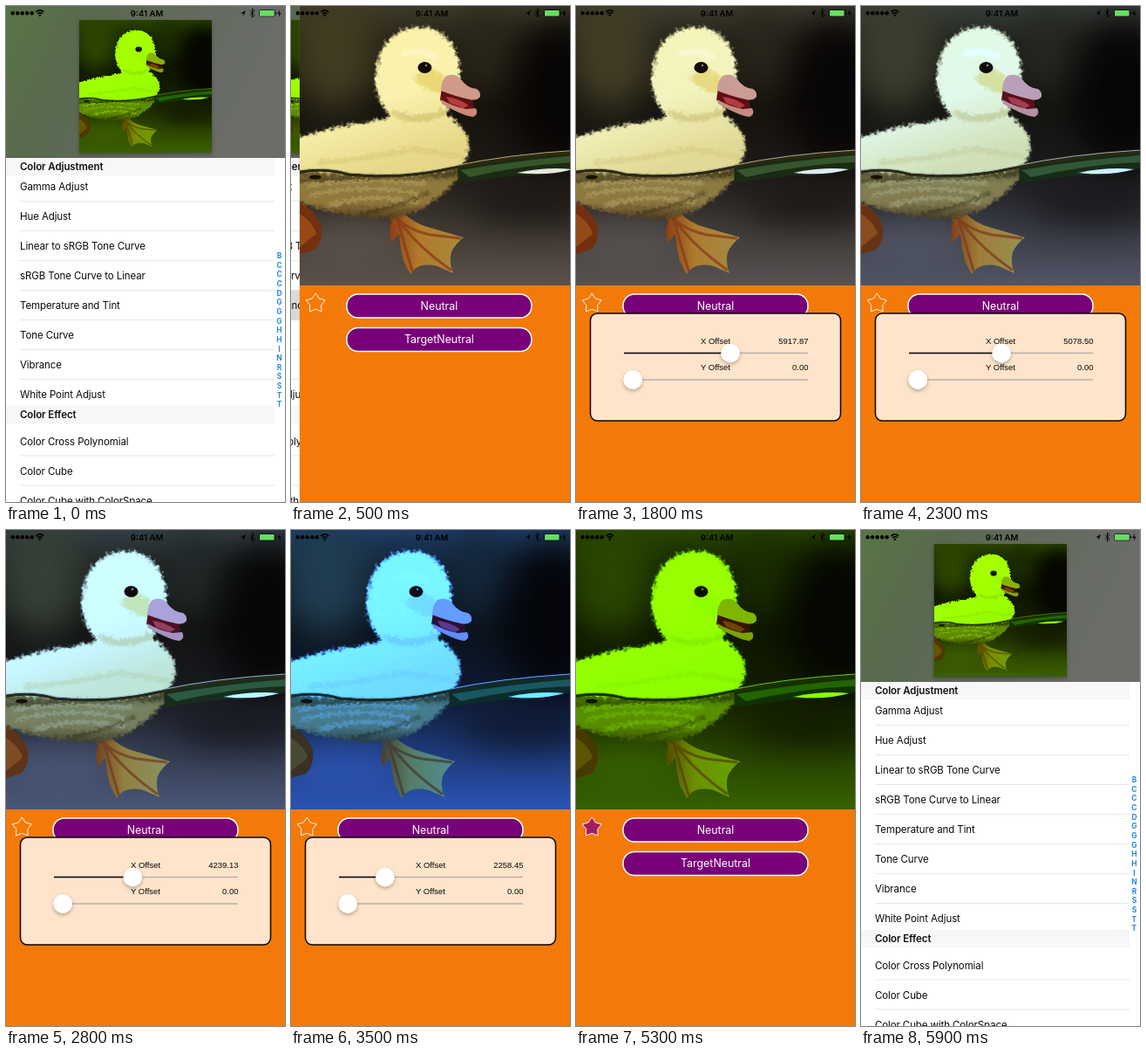
Animation, 320 px wide and 568 px high, one loop 6 s. Source, as an HTML page:

```html
<!DOCTYPE html>
<html lang="en">
<head>
<meta charset="utf-8">
<title>Colour filter browser</title>
<style>
html, body { margin: 0; width: 100%; height: 100%; overflow: hidden; background: #fff; }
svg { display: block; width: 320px; height: 568px; }
text { font-family: Inter, "Open Sans", sans-serif; }
.row { font-size: 11.5px; letter-spacing: -.1px; fill: #0a0a0a; }
.head { font-size: 11.5px; font-weight: 600; letter-spacing: -.1px; fill: #111; }
.index { font-size: 8.4px; font-weight: 700; fill: #2588e6; text-anchor: middle; }
.btn { font-size: 12.4px; fill: #fff; text-anchor: middle; }
.label { font: 9.5px "Liberation Sans", Arial, sans-serif; fill: #080808; }
.end { text-anchor: end; }
</style>
</head>
<body>
<svg viewBox="0 0 320 568">
  <defs>
    <filter id="tint" filterUnits="userSpaceOnUse" x="0" y="0" width="320" height="320" color-interpolation-filters="sRGB">
      <feColorMatrix id="gain" values="1 0 0 0 0 0 1 0 0 0 0 0 1 0 0 0 0 0 1 0"/>
    </filter>
    <filter id="green" filterUnits="userSpaceOnUse" x="0" y="0" width="320" height="320" color-interpolation-filters="sRGB">
      <feColorMatrix values=".66 0 0 0 0 0 1.16 0 0 0 0 0 0 0 0 0 0 0 1 0"/>
    </filter>
    <filter id="fur" filterUnits="userSpaceOnUse" x="-20" y="0" width="360" height="320" color-interpolation-filters="sRGB">
      <feTurbulence type="fractalNoise" baseFrequency=".22" numOctaves="2" seed="4" result="noise"/>
      <feGaussianBlur in="SourceGraphic" stdDeviation="1.4" result="soft"/>
      <feDisplacementMap in="soft" in2="noise" scale="9" xChannelSelector="R" yChannelSelector="G"/>
    </filter>
    <filter id="haze" filterUnits="userSpaceOnUse" x="-80" y="-80" width="480" height="480" color-interpolation-filters="sRGB">
      <feGaussianBlur stdDeviation="20"/>
    </filter>
    <filter id="drop" x="-60%" y="-60%" width="220%" height="220%">
      <feDropShadow dx="0" dy="2" stdDeviation="2" flood-opacity=".3"/>
    </filter>
    <linearGradient id="back" x2="0" y2="1">
      <stop offset="0" stop-color="#3f3b2b"/><stop offset=".14" stop-color="#221f14"/>
      <stop offset=".35" stop-color="#16130c"/><stop offset=".6" stop-color="#1f1a16"/>
      <stop offset=".78" stop-color="#3d3731"/><stop offset="1" stop-color="#5a524b"/>
    </linearGradient>
    <linearGradient id="down" x2=".4" y2="1">
      <stop offset="0" stop-color="#fbf2a6"/><stop offset=".6" stop-color="#f9f1ad"/><stop offset="1" stop-color="#e6d888"/>
    </linearGradient>
    <linearGradient id="belly" x2="0" y2="1">
      <stop offset="0" stop-color="#3a3014"/><stop offset=".3" stop-color="#8f7a3c"/>
      <stop offset=".7" stop-color="#90763a"/><stop offset="1" stop-color="#4d3a1c"/>
    </linearGradient>
    <linearGradient id="web">
      <stop offset="0" stop-color="#8a3a12"/><stop offset=".4" stop-color="#b07a2a"/><stop offset="1" stop-color="#a88a3e"/>
    </linearGradient>
    <linearGradient id="blurred" y2=".25">
      <stop offset="0" stop-color="#587545"/><stop offset=".3" stop-color="#59694f"/>
      <stop offset=".75" stop-color="#666b62"/><stop offset="1" stop-color="#6b6d69"/>
    </linearGradient>
    <clipPath id="square"><path d="M0 0h320v320H0z"/></clipPath>

    <g id="duck" clip-path="url(#square)">
      <path d="M0 0h320v320H0z" fill="url(#back)"/>
      <g filter="url(#haze)">
        <ellipse cx="40" cy="50" rx="48" ry="70" fill="#423c22"/>
        <ellipse cx="215" cy="45" rx="30" ry="50" fill="#2a271a"/>
        <ellipse cx="300" cy="100" rx="60" ry="85" fill="#080605"/>
        <ellipse cx="270" cy="225" rx="80" ry="22" fill="#1b1613"/>
        <ellipse cx="60" cy="275" rx="70" ry="25" fill="#5a524a"/>
      </g>
      <path d="M0 224Q18 234 25 252Q27 270 17 279L0 284Z" fill="#74300f"/>
      <path d="M0 238Q16 248 19 261L0 276Z" fill="#984916"/>
      <path d="M101 239L117 235Q132 250 150 254L188 265Q178 273 174 282Q171 294 176 306L158 298Q142 294 132 301L127 307L119 292Q115 277 114 261L105 271Q101 254 106 248Z" fill="url(#web)"/>
      <path d="M109 241Q125 257 150 262L184 266M112 243Q133 274 173 302M112 244Q120 272 129 303" fill="none" stroke="#8a3a16" stroke-width="3" stroke-linecap="round" opacity=".75"/>
      <g filter="url(#fur)">
        <path d="M-10 190L190 184Q181 203 158 220Q130 242 98 243Q46 244 -10 221Z" fill="url(#belly)"/>
        <path d="M8 206Q70 196 145 204M12 217Q80 201 142 217M32 229Q85 212 138 226" fill="none" stroke="#d6c683" stroke-width="2.500" opacity=".55"/>
        <path d="M-10 201Q60 196 180 193M70 238Q112 231 148 213" fill="none" stroke="#2c230d" stroke-width="3" opacity=".6"/>
      </g>
      <g filter="url(#fur)">
        <path d="M-12 154Q30 140 62 135Q86 132 104 127C92 113 84 94 88 74C91 44 109 24 138 24C162 24 180 43 183 66C185 86 181 106 170 118Q168 124 176 130Q193 142 194 158Q195 175 184 185Q130 199 60 193L-12 188Z" fill="url(#down)"/>
        <path d="M108 122Q134 137 168 120" fill="none" stroke="#bfab52" stroke-width="8" opacity=".45"/>
        <path d="M20 180Q86 174 128 164Q158 167 189 174" fill="none" stroke="#dccb78" stroke-width="6" opacity=".7"/>
        <path d="M130 82Q142 98 165 100L166 80L150 70Z" fill="#e6cf62" opacity=".7"/>
        <path d="M118 56Q138 47 158 60" fill="none" stroke="#fffbd0" stroke-width="8" opacity=".6"/>
      </g>
      <path d="M163 94L198 106L201 122L184 119L161 108Z" fill="#5e1014"/>
      <path d="M168 80Q179 76 185 84Q192 94 203 95Q208 98 207 104Q203 109 195 107Q180 104 162 97Q162 86 168 80Z" fill="#cf9a88"/>
      <path d="M162 107Q176 115 191 118L202 117Q206 124 199 127Q188 126 163 112Z" fill="#c98a78"/>
      <path d="M168 104Q182 105 194 114L188 117L172 111Z" fill="#b83a3c"/>
      <ellipse cx="143.500" cy="70.500" rx="8" ry="6.500" fill="#110b08"/>
      <circle cx="145" cy="68" r="1.200" fill="#8c8c84"/>
      <path d="M181 182Q250 171 320 166V186Q288 194 250 194Q214 198 182 203Z" fill="#1b2a12"/>
      <path d="M184 188Q248 177 320 171V179Q260 181 195 196Z" fill="#365528"/>
      <path d="M249 191Q283 184 313 187Q286 195 249 191Z" fill="#e5e9dd"/>
      <path d="M0 190Q30 185 57 193Q118 199 178 185Q238 172 320 167" fill="none" stroke="#30280f" stroke-width="3.500"/>
      <path d="M0 188Q30 183 57 191Q118 197 178 183Q238 170 320 165" fill="none" stroke="#bdbb92" stroke-width=".9"/>
      <ellipse cx="18" cy="196" rx="7" ry="2.500" fill="#171207"/>
    </g>
  </defs>

  <g id="list">
    <path d="M0 0h320v568H0z" fill="#fff"/>
    <path d="M0 0h320v174H0z" fill="url(#blurred)"/>
    <path d="M84 16h152v152H84z" filter="url(#drop)"/>
    <g transform="translate(84 16) scale(.475)"><use href="#duck" filter="url(#green)"/></g>
    <path id="pressed" d="M0 326h320v34H0z" fill="#d9d9d9"/>
    <g id="rows"></g>
  </g>

  <g id="detail">
    <path d="M0 0h320v568H0z" fill="#f37a08"/>
    <use href="#duck" filter="url(#tint)"/>
    <path id="star" stroke="#fff" stroke-width=".9" stroke-linejoin="round"/>
    <g id="buttons"></g>
  </g>

  <g id="panel">
    <rect x="16.500" y="352" width="287" height="123" rx="8" fill="#fde4ca" stroke="#0b0704" stroke-width="1.500"/>
    <g id="sliders"></g>
  </g>

  <g id="status">
    <g id="dots"></g>
    <g fill="none" stroke="#000" stroke-width="1.500">
      <path d="M34.300 7Q38.800 2.800 43.300 7M36 9Q38.800 6.500 41.600 9"/>
      <path d="M280 5.500L285 10.500L282.500 13V3L285 5.500L280 10.500" stroke-width=".9"/>
      <rect x="290.500" y="4.500" width="18" height="7.500" rx="1.500" stroke-width=".6"/>
    </g>
    <circle cx="38.800" cy="10.800" r="1.200"/>
    <text x="161.500" y="11.600" text-anchor="middle" font-size="9.600" font-weight="600">9:41 AM</text>
    <path d="M269 8.500L275 5L272.500 11.500L272 8.500Z"/>
    <rect x="291" y="5" width="16.500" height="6.500" rx=".8" fill="#65df62"/>
    <path d="M309.300 7v2.500h1V7zM314 4l-2.500 5h2l-.8 4 2.800-5.200h-2z"/>
  </g>
</svg>

<script>
const $ = id => document.getElementById(id);
const LOOP = 6000, STEP = 100;

const text = (cls, x, y, s, extra = "") => `<text class="${cls}" x="${x}" y="${y}" ${extra}>${s}</text>`;
const header = (y, s) => `<path d="M0 ${y}h308v20H0z" fill="#f7f6f8"/>` + text("head", 16, y + 14.2, s);
const row = (y, s) => text("row", 16, y + 4, s) +
  `<path d="M16 ${y + 16.5}H308" stroke="#dcdce0" stroke-width=".7"/>`;

const adjust = ["Gamma Adjust", "Hue Adjust", "Linear to sRGB Tone Curve", "sRGB Tone Curve to Linear",
  "Temperature and Tint", "Tone Curve", "Vibrance", "White Point Adjust"];
const effect = ["Color Cross Polynomial", "Color Cube", "Color Cube with ColorSpace"];

$("rows").innerHTML =
  adjust.map((s, i) => row(207 + 34 * i, s)).join("") +
  effect.map((s, i) => row(498.5 + 34 * i, s)).join("") +
  header(174, "Color Adjustment") + header(458, "Color Effect") +
  [..."BCCCDGGGHHINRSSTT"].map((c, i) => text("index", 313.5, 289 + 10.65 * i, c)).join("");

$("buttons").innerHTML = ["Neutral", "TargetNeutral"].map((s, i) => {
  const y = 330 + 38.5 * i;
  return `<rect x="54" y="${y}" width="212" height="27" rx="13" fill="#780078" stroke="#fff" stroke-width="1.5"/>` +
    text("btn", 160, y + 17.9, s);
}).join("");

$("sliders").innerHTML = ["X", "Y"].map((n, i) => {
  const y = 397.5 + 30.5 * i;
  return text("label", 143, y - 10.8, n + " Offset") + text("label end", 266.5, y - 10.8, "", `id="val${n}"`) +
    `<path d="M55 ${y}H266" stroke="#b7b1ac" stroke-width="1.7"/>` +
    `<path id="fill${n}" stroke="#090909" stroke-width="1.7"/>` +
    `<circle id="knob${n}" cy="${y}" r="10.7" fill="#fff" filter="url(#drop)"/>`;
}).join("");

$("dots").innerHTML = [0, 1, 2, 3, 4].map(i => `<circle cx="${7.7 + 5.5 * i}" cy="8.3" r="2.2"/>`).join("");

$("star").setAttribute("d", "M" + Array.from({ length: 10 }, (_, i) => {
  const r = i % 2 ? 6.8 : 11.6, a = i * Math.PI / 5;
  return `${(18.3 + r * Math.sin(a)).toFixed(2)} ${(340.5 - r * Math.cos(a)).toFixed(2)}`;
}).join("L") + "Z");

// time, X, Y, then red, green and blue gain
const keys = [
  [1400, 6500, 0, 1, 1, 1],
  [1800, 5917.87, 0, .98, 1.01, 1.1],
  [2800, 4239.13, 0, .82, 1.06, 1.6],
  [2900, 4239.13, 0, .82, 1.06, 1.6],
  [3500, 2258.45, 0, .48, 1.02, 2.4],
  [4100, 2258.45, 507.25, .64, 1.14, 0],
  [4800, 2258.45, 820.4, .61, 1.18, 0]
];

function sample(t) {
  const i = keys.findIndex(k => k[0] > t);
  if (i < 0) return keys[keys.length - 1].slice(1);
  if (i === 0) return keys[0].slice(1);
  const a = keys[i - 1], b = keys[i], p = (t - a[0]) / (b[0] - a[0]);
  return a.slice(1).map((v, j) => v + (b[j + 1] - v) * p);
}

const since = (t, start) => Math.max(0, t - start) / 1000;
const spring = (t, start, rate) => {
  const u = since(t, start) * rate;
  return 1 - (1 + u) * Math.exp(-u);
};
const decay = (t, start) => Math.exp(-14.5 * since(t, start));
const move = (id, x, y) => $(id).setAttribute("transform", `translate(${x.toFixed(2)} ${y.toFixed(2)})`);
const show = (id, on) => $(id).setAttribute("visibility", on ? "visible" : "hidden");

function setSlider(name, value, y) {
  const x = 65.2 + value * .0189;
  $("val" + name).textContent = value.toFixed(2);
  $("knob" + name).setAttribute("cx", x);
  $("fill" + name).setAttribute("d", `M55 ${y}H${x}`);
}

function draw(t) {
  const [x, y, r, g, b] = sample(t);
  setSlider("X", x, 397.5);
  setSlider("Y", y, 428);
  $("gain").setAttribute("values", `${r} 0 0 0 0 0 ${g} 0 0 0 0 0 ${b} 0 0 0 0 0 1 0`);

  const back = spring(t, 5380, 18);
  const pushed = spring(t, 120, 14) - back;
  move("list", -96 * pushed, 0);
  move("detail", 320 * (1 - pushed), 0);
  show("detail", pushed > .004);
  $("pressed").setAttribute("opacity", t < 100 || back > .99 ? 0 : 1 - back);

  const drop = t < 4980 ? 216 * decay(t, 730) : 222 * (1 - decay(t, 4980));
  move("panel", 0, drop);
  show("panel", t > 730 && t < 5300);
  $("star").setAttribute("fill", t >= 5200 ? "#a01d60" : "none");
}

const start = performance.now();
let shown = -1;
function tick(now) {
  const t = Math.floor(Math.max(0, now - start) % LOOP / STEP) * STEP;
  if (t !== shown) draw(shown = t);
  requestAnimationFrame(tick);
}
tick(start);
</script>
</body>
</html>
```
